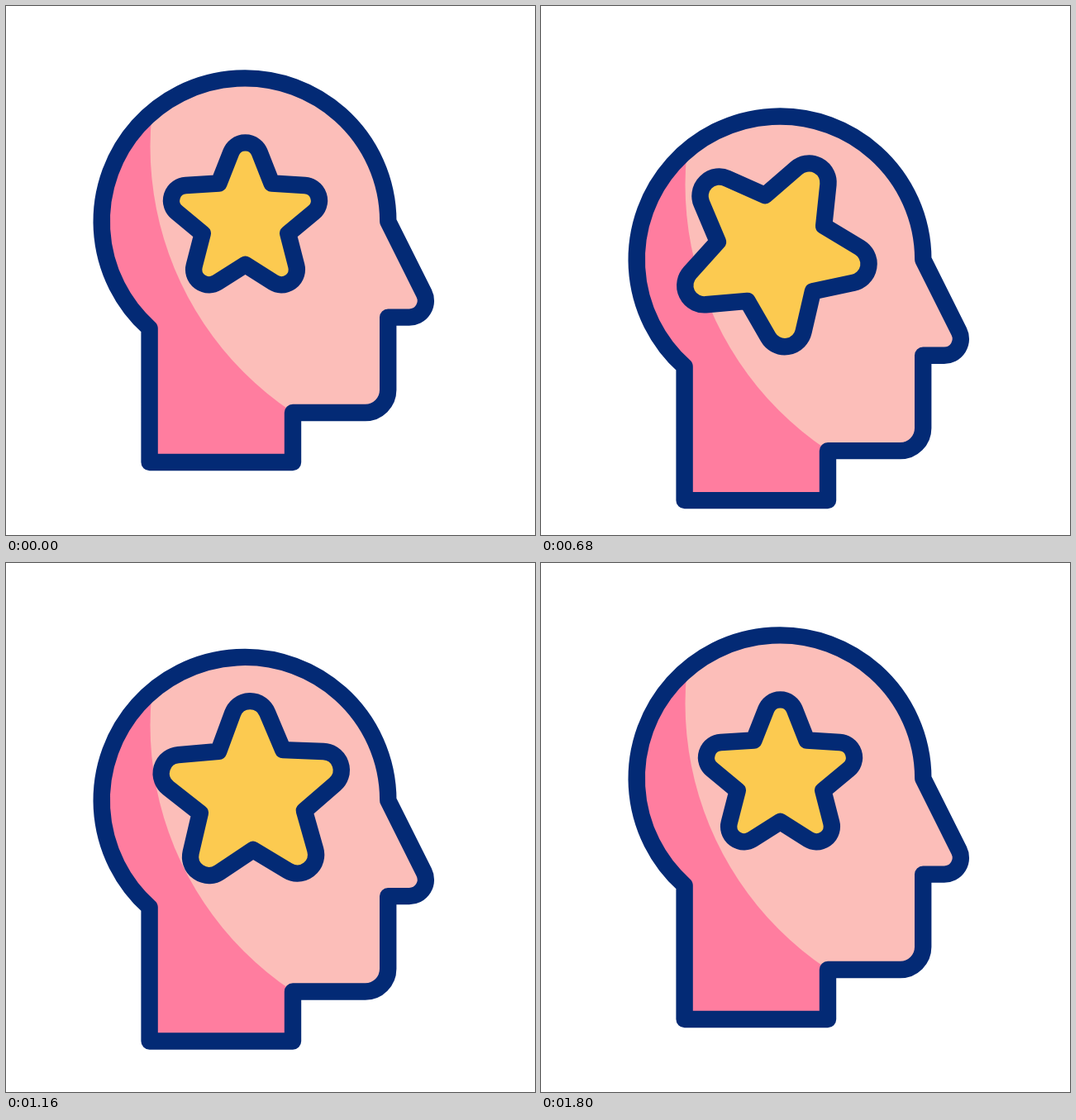
These frames come from a looping animation (640 by 640 pixels, 1.92 s). An HTML page with a canvas:

```html
<!DOCTYPE html>
<html lang="en">
<head>
<meta charset="utf-8">
<title>Star mind</title>
<style>
html, body { margin: 0; width: 100%; height: 100%; overflow: hidden; background: #fff; }
canvas { display: block; width: 100%; height: 100%; }
</style>
</head>
<body>
<canvas id="stage" width="640" height="640"></canvas>
<script>
const ctx = document.getElementById('stage').getContext('2d');
const LOOP = 1920, STEP = 40, TAU = Math.PI * 2;
const NAVY = '#032a75', SKIN = '#fcbeb9', PINK = '#ff7d9f', GOLD = '#fcca50';

// cubic-bezier(.5, 0, .5, 1), solved by bisection
function ease(x) {
  if (x <= 0) return 0;
  if (x >= 1) return 1;
  let lo = 0, hi = 1;
  for (let i = 0; i < 30; i++) {
    const u = (lo + hi) / 2;
    if (1.5 * u * (1 - u) + u * u * u < x) lo = u; else hi = u;
  }
  return lo * lo * (3 - 2 * lo);
}

const ramp = (t, from, to) => ease((t - from) / (to - from));
const pulse = (t, from, peak, to) => t < peak ? ramp(t, from, peak) : 1 - ramp(t, peak, to);

const head = new Path2D();
(function buildHead() {
  const cx = 289, cy = 260.7, r = 173.3, neck = 173.6, face = 462.2;
  const nape = Math.PI - Math.acos((cx - neck) / r);
  head.arc(cx, cy, r, nape, TAU);
  head.arcTo(520.2, 376.6, face, 376.6, 20);
  head.lineTo(face, 376.6);
  head.arcTo(face, 492, 347, 492, 27.5);
  head.lineTo(347, 492);
  head.lineTo(347, 552);
  head.lineTo(neck, 552);
  head.closePath();
})();

function drawHead() {
  ctx.save();
  ctx.clip(head);
  ctx.fillStyle = PINK;
  ctx.fillRect(90, 60, 440, 510);
  ctx.fillStyle = SKIN;
  ctx.beginPath();
  ctx.arc(560.5, 170, 386, 0, TAU);
  ctx.fill();
  ctx.restore();
  ctx.stroke(head);
}

function drawStar(scale, turn) {
  const tip = 125 * scale, dent = 54.4 * scale, round = 18.5 * scale;
  const at = (r, a) => [r * Math.sin(a), 6.75 * scale - r * Math.cos(a)];
  ctx.save();
  ctx.translate(289.5, 251.75);
  ctx.rotate(turn);
  ctx.beginPath();
  ctx.moveTo(...at(dent, -TAU / 10));
  for (let i = 0; i < 5; i++) {
    const a = i * TAU / 5, next = at(dent, a + TAU / 10);
    ctx.arcTo(...at(tip, a), ...next, round);
    ctx.lineTo(...next);
  }
  ctx.closePath();
  ctx.fillStyle = GOLD;
  ctx.fill();
  ctx.stroke();
  ctx.restore();
}

function draw(now) {
  const t = Math.floor((now % LOOP) / STEP) * STEP;
  ctx.fillStyle = '#fff';
  ctx.fillRect(0, 0, 640, 640);
  ctx.save();
  ctx.translate(0, 48 * pulse(t, 40, 800, 1560));
  ctx.strokeStyle = NAVY;
  ctx.lineWidth = 20.4;
  ctx.lineJoin = 'round';
  drawHead();
  drawStar(1 + 0.275 * pulse(t, 40, 860, 1760), TAU * ramp(t, 40, 1720));
  ctx.restore();
  requestAnimationFrame(draw);
}

draw(performance.now());
</script>
</body>
</html>
```
